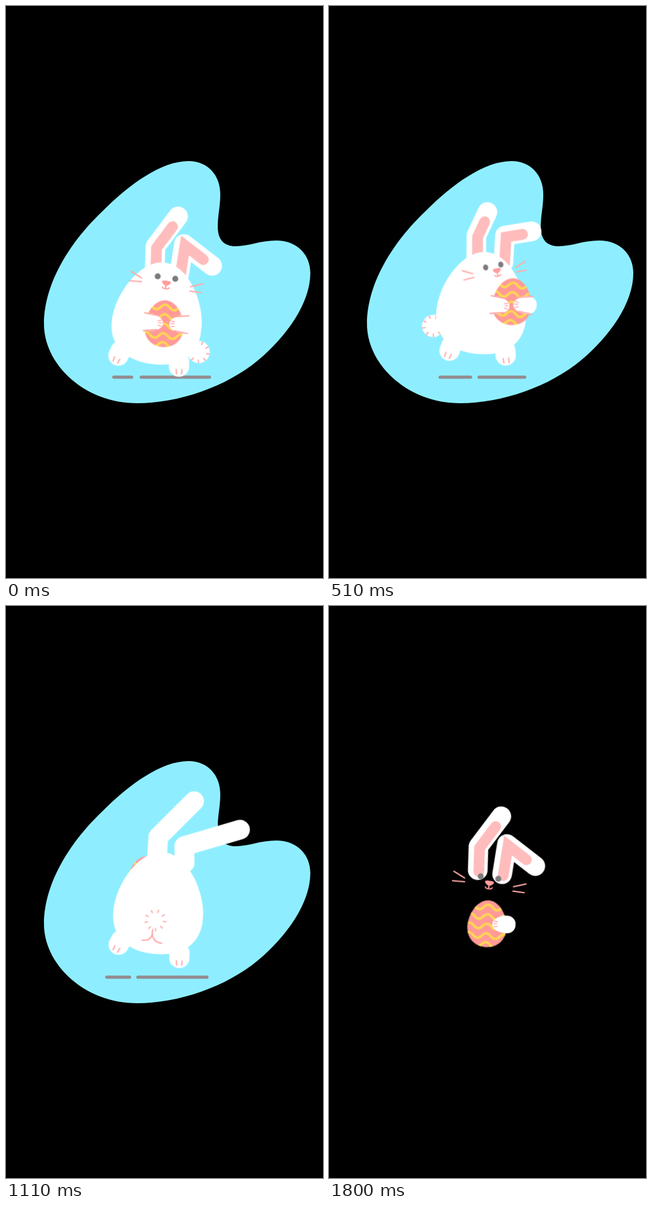
Recreate the animation shown at these times as an HTML page without scripts. Size 500x900 px, loop 1830 ms.

```html
<!DOCTYPE html>
<html lang="en">
<head>
<meta charset="utf-8">
<title>Dancing bunny</title>
<style>
html, body { margin: 0; width: 100%; height: 100%; overflow: hidden; background: #000; }
svg { display: block; width: 100vw; height: 100vh; }
.line { fill: none; stroke-linecap: round; stroke-linejoin: round; }

/* every animated part shares one clock */
[data-a] { animation: 1.83s linear infinite; }
[data-a=gone] { animation-name: gone; animation-timing-function: step-end; }
[data-a=hop] { animation-name: hop; animation-timing-function: cubic-bezier(.37,0,.63,1); }
[data-a=sway] { animation-name: sway; animation-timing-function: cubic-bezier(.37,0,.63,1); }
[data-a=floor] { animation-name: floor; }
[data-a=earL] { animation-name: earL; }
[data-a=earR] { animation-name: earR; }
[data-a=face] { animation-name: face; }
[data-a=nose] { animation-name: nose; }
[data-a=egg] { animation-name: egg; }
[data-a=tint] { animation-name: tint; }
[data-a=pawL] { animation-name: pawL; }
[data-a=pawR] { animation-name: pawR; }
[data-a=footL] { animation-name: footL; }
[data-a=footR] { animation-name: footR; }
[data-a=tail] { animation-name: tail; }
[data-a=rump] { animation-name: rump; }
[data-a=front] { animation-name: front; animation-timing-function: step-end; }
[data-a=back] { animation-name: back; animation-timing-function: step-end; }
[data-a=inner] { animation-name: inner; animation-timing-function: step-end; }
[data-a=tailFront] { animation-name: tailFront; animation-timing-function: step-end; }
[data-a=showL] { animation-name: showL; animation-timing-function: step-end; }
[data-a=showR] { animation-name: showR; animation-timing-function: step-end; }

/* visibility switches */
@keyframes gone { 0% { opacity: 1 } 98.36%, 100% { opacity: 0 } }
@keyframes front { 0%, 80.3%, 100% { opacity: 1 } 43.7% { opacity: 0 } }
@keyframes back { 0%, 80.3%, 100% { opacity: 0 } 43.7% { opacity: 1 } }
@keyframes inner { 0%, 78.6%, 100% { opacity: 1 } 46.7% { opacity: 0 } }
@keyframes tailFront { 0%, 80.8%, 100% { opacity: 0 } 34.4% { opacity: 1 } }
@keyframes showL { 0%, 91.8%, 100% { opacity: 1 } 43.7% { opacity: 0 } }
@keyframes showR { 0%, 72.1%, 100% { opacity: 1 } 32.7% { opacity: 0 } }
@keyframes rump { 0%, 47%, 74%, 100% { opacity: 0 } 54%, 67% { opacity: 1 } }

/* body */
@keyframes hop {
  0%, 16.39%, 32.79%, 49.18%, 65.57%, 81.97%, 98.36%, 100% { transform: translateY(0) }
  8.2%, 24.59%, 40.98%, 57.38%, 73.77%, 90.16% { transform: translateY(-25px) }
}
@keyframes sway {
  0%, 32.79%, 65.57%, 98.36%, 100% { transform: translate(240px,485px) rotate(8deg) }
  16.39%, 49.18%, 81.97% { transform: translate(247px,485px) rotate(-8deg) }
}
@keyframes floor {
  0%, 98.36%, 100% { d: path("M170,584H198M213,584H321") }
  18.03% { d: path("M174,584H275M289,584H312") }
  32.79% { d: path("M176,584H198M211,584H307") }
  37.7% { d: path("M179,584H213M226,584H302") }
  49.18% { d: path("M170,584H266M280,584H311") }
  60.65% { d: path("M159,584H195M208,584H317") }
  65.57% { d: path("M154,584H192M205,584H317") }
  75.41% { d: path("M150,584H241M254,584H317") }
  81.97% { d: path("M151,584H264M277,584H318") }
  86.88% { d: path("M154,584H261M275,584H318") }
}

/* ears: base, bend, tip */
@keyframes earL {
  0%, 98.36%, 100% { d: path("M-15,-68L-19,-105L10,-157") }
  18.03% { d: path("M-25,-67L-32,-109L-91,-85") }
  30.6% { d: path("M-12,-67L-14,-106L20,-161") }
  37.7% { d: path("M-9,-67L-10,-113L-50,-147") }
  48.1% { d: path("M-15,-67L-20,-108L-85,-100") }
  60.65% { d: path("M-9,-67L-10,-105L42,-166") }
  75.41% { d: path("M-25,-67L-29,-99L-66,-126") }
  86.88% { d: path("M-30,-68L-32,-101L-90,-114") }
  95.08% { d: path("M-18,-67L-20,-105L14,-158") }
}
@keyframes earR {
  0%, 98.36%, 100% { d: path("M24,-67L25,-115L74,-87") }
  18.03% { d: path("M21,-67L16,-118L-31,-166") }
  30.6% { d: path("M30,-68L30,-108L95,-108") }
  37.7% { d: path("M36,-68L35,-114L33,-148") }
  48.1% { d: path("M25,-68L22,-116L-25,-165") }
  60.65% { d: path("M35,-68L32,-94L118,-127") }
  75.41% { d: path("M17,-66L10,-116L2,-173") }
  86.88% { d: path("M14,-68L7,-118L-6,-157") }
  95.08% { d: path("M24,-67L25,-112L78,-96") }
}

/* turning parts */
@keyframes face {
  0%, 98.36%, 100% { transform: translate(5px,-59px) rotate(0) scaleX(1) }
  18.03% { transform: translate(-5px,-62px) rotate(-8deg) scaleX(.98) }
  37.7% { transform: translate(30px,-60px) rotate(-23deg) scaleX(.76) }
  43.72% { transform: translate(42px,-58px) rotate(-20deg) scaleX(.4) }
  79% { transform: translate(-38px,-56px) rotate(12deg) scaleX(.5) }
  86.88% { transform: translate(-21px,-58px) rotate(9deg) scaleX(.84) }
}
@keyframes nose {
  0%, 98.36%, 100% { transform: translateX(1px) }
  18.03% { transform: translate(3px,-1px) }
  37.7%, 43.72% { transform: translateX(7px) }
  79%, 86.88% { transform: translateX(-3px) }
}
@keyframes egg {
  0%, 98.36%, 100% { transform: translate(11.5px,13.5px) rotate(-4deg) }
  18.03% { transform: translate(16.5px,-4px) rotate(2deg) }
  37.7% { transform: translate(77px,-11px) rotate(-3deg) }
  43.72% { transform: translate(74px,-16px) rotate(-3deg) }
  60.65% { transform: translate(-22px,-37px) rotate(-3deg) }
  75.41% { transform: translate(-65px,-21px) rotate(2deg) }
  86.88% { transform: translate(-51px,0) rotate(3deg) }
}
@keyframes tint {
  0%, 62%, 85%, 100% { fill: #ff9a98; stroke: #ffd94f }
  75.41% { fill: #ffbfc0; stroke: #fff0ec }
}
@keyframes pawL {
  0%, 98.36%, 100% { transform: translate(-20px,-1px) }
  18.03% { transform: translate(-25px,8px) }
  37.7% { transform: translate(-18px,6px) }
}
@keyframes pawR {
  0%, 98.36%, 100% { transform: translate(26px,-1px) }
  18.03% { transform: translate(24px,-1px) }
  72%, 75.41% { transform: translate(4px,23px) }
  86.88% { transform: translate(20px,13px) }
}
@keyframes footL {
  0%, 98.36%, 100% { transform: translate(-53px,73px) rotate(17deg) }
  18.03% { transform: translate(-52px,77px) rotate(12deg) }
  37.7% { transform: translate(-38px,78px) rotate(20deg) }
  60.65% { transform: translate(-58px,69px) rotate(24deg) }
  75.41% { transform: translate(-50px,78px) rotate(8deg) }
  86.88% { transform: translate(-47px,80px) rotate(7deg) }
}
@keyframes footR {
  0%, 98.36%, 100% { transform: translate(44px,77px) rotate(-8deg) }
  18.03% { transform: translate(50px,74px) rotate(-17deg) }
  37.7% { transform: translate(38px,81px) rotate(-3deg) }
  60.65% { transform: translate(39px,82px) rotate(-3deg) }
  75.41% { transform: translate(41px,77px) rotate(-22deg) }
  86.88% { transform: translate(37px,78px) rotate(-18deg) }
}
@keyframes tail {
  0%, 98.36%, 100% { transform: translate(72px,50px) }
  18.03% { transform: translate(-74px,49px) }
  37.7% { transform: translate(-74px,33px) }
  60.65% { transform: translate(-4px,26px) }
  75.41% { transform: translate(62px,38px) }
  86.88% { transform: translate(70px,39px) }
}
</style>
</head>
<body>
<svg viewBox="0 0 500 900">
  <defs>
    <path id="shell" d="M0,-37C18,-37 31,-14 31,6C31,25 17,37 0,37S-31,25 -31,6C-31,-14 -18,-37 0,-37Z"/>
    <clipPath id="cut"><use href="#shell"/></clipPath>
    <path id="wave" d="M-35,0q7,-8 14,0t14,0t14,0t14,0t14,0" fill="none" stroke-width="3.6"/>
    <g id="eggArt" clip-path="url(#cut)">
      <use href="#shell" stroke="none"/>
      <use href="#wave" y="-26"/>
      <use href="#wave" y="-11"/>
      <use href="#wave" y="4"/>
      <use href="#wave" y="19"/>
      <use href="#wave" y="33"/>
    </g>
    <g id="foot">
      <rect x="-16" y="-24" width="32" height="40" rx="16" fill="#fff"/>
      <path class="line" stroke="#ffa6a6" stroke-width="2" d="M-4.500,4.500l.5,7M4.500,4.500l-.5,7"/>
    </g>
    <g id="paw">
      <path fill="#fff" d="M5,-14A14,14 0 0 1 5,14C-5,14 -18,10 -18,1S-5,-14 5,-14Z"/>
      <path class="line" stroke="#ffa6a6" stroke-width="1.500" d="M-15,-4l5,1M-16,0h5M-15,5l5,-1"/>
    </g>
    <path id="cuff" class="line" stroke="#ffa6a6" stroke-width="2" d="M-11,-11L12,-14M-9,11L12,14"/>
    <g id="puff">
      <circle r="17.500" fill="#fff"/>
      <circle r="14.500" fill="none" stroke="#ffa6a6" stroke-width="5.500" pathLength="90" stroke-dasharray="1.8 8.2"/>
    </g>
  </defs>

  <g data-a="gone">
    <path fill="#8eeeff" d="M288,244C318,244 338,266 338,296C338,316 334,328 334,347C334,368 344,378 362,378C384,378 400,369 426,369C460,369 480,392 480,420C480,468 442,520 398,557C348,599 272,625 207,625C126,625 63,567 60,505C58,435 105,368 150,325C195,280 245,244 288,244Z"/>
    <path data-a="floor" class="line" stroke="#938c8f" stroke-width="5" d="M170,584H198M213,584H321"/>
  </g>

  <g data-a="hop"><g data-a="sway">
    <g data-a="gone"><g data-a="tail"><use href="#puff"/></g></g>
    <g data-a="back"><g data-a="egg"><g data-a="tint"><use href="#eggArt"/></g></g></g>

    <g class="line" stroke="#fff" stroke-width="31">
      <path data-a="earL"/>
      <path data-a="earR"/>
    </g>
    <g data-a="inner">
      <g transform="translate(2,2)" fill="none" stroke="#ffbcbc" stroke-width="17" stroke-linecap="round">
        <path data-a="earL" pathLength="100" stroke-dasharray="82 100"/>
        <path data-a="earR" pathLength="100" stroke-dasharray="81 100"/>
      </g>
    </g>

    <g data-a="gone">
      <path fill="#fff" d="M0,-82C38,-82 71,-26 71,18C71,57 44,79 0,79S-71,57 -71,18C-71,-26 -38,-82 0,-82Z"/>
      <g data-a="footL"><use href="#foot"/></g>
      <g data-a="footR"><use href="#foot"/></g>
    </g>

    <g data-a="front">
      <g data-a="face">
        <g fill="#7c7a7c"><circle cx="-14" r="4.700"/><circle cx="14" r="4.700"/></g>
        <path class="line" stroke="#ffaaa6" stroke-width="2" d="M-57,-2L-39,6M-57,13L-38,12M39.500,9L58.500,2M39.500,16L57.500,16"/>
        <g data-a="nose">
          <path fill="#ff9d9d" d="M-4,5H4Q9,6 6,9.500Q3,13 0,13T-6,9.500Q-9,6 -4,5Z"/>
          <path class="line" stroke="#ff9d9d" stroke-width="2" d="M0,12V16M-5.500,15.500Q-3,19 0,17Q3,19 5.500,15.500"/>
        </g>
      </g>
      <g data-a="egg"><g data-a="tint"><use href="#eggArt"/></g></g>
    </g>

    <g data-a="egg">
      <g data-a="showL"><g data-a="gone"><g data-a="pawL"><g transform="scale(-1,1)">
        <use href="#paw"/><use href="#cuff"/>
      </g></g></g></g>
      <g data-a="showR"><g data-a="pawR">
        <use href="#paw"/><g data-a="gone"><use href="#cuff"/></g>
      </g></g>
    </g>

    <g data-a="tailFront"><g data-a="tail">
      <use href="#puff"/>
      <path data-a="rump" class="line" stroke="#ffa6a6" stroke-width="2.200" d="M-18,33Q-4,33 -3,22V15M-3,22Q0,35 13,35"/>
    </g></g>
  </g></g>
</svg>
</body>
</html>
```
